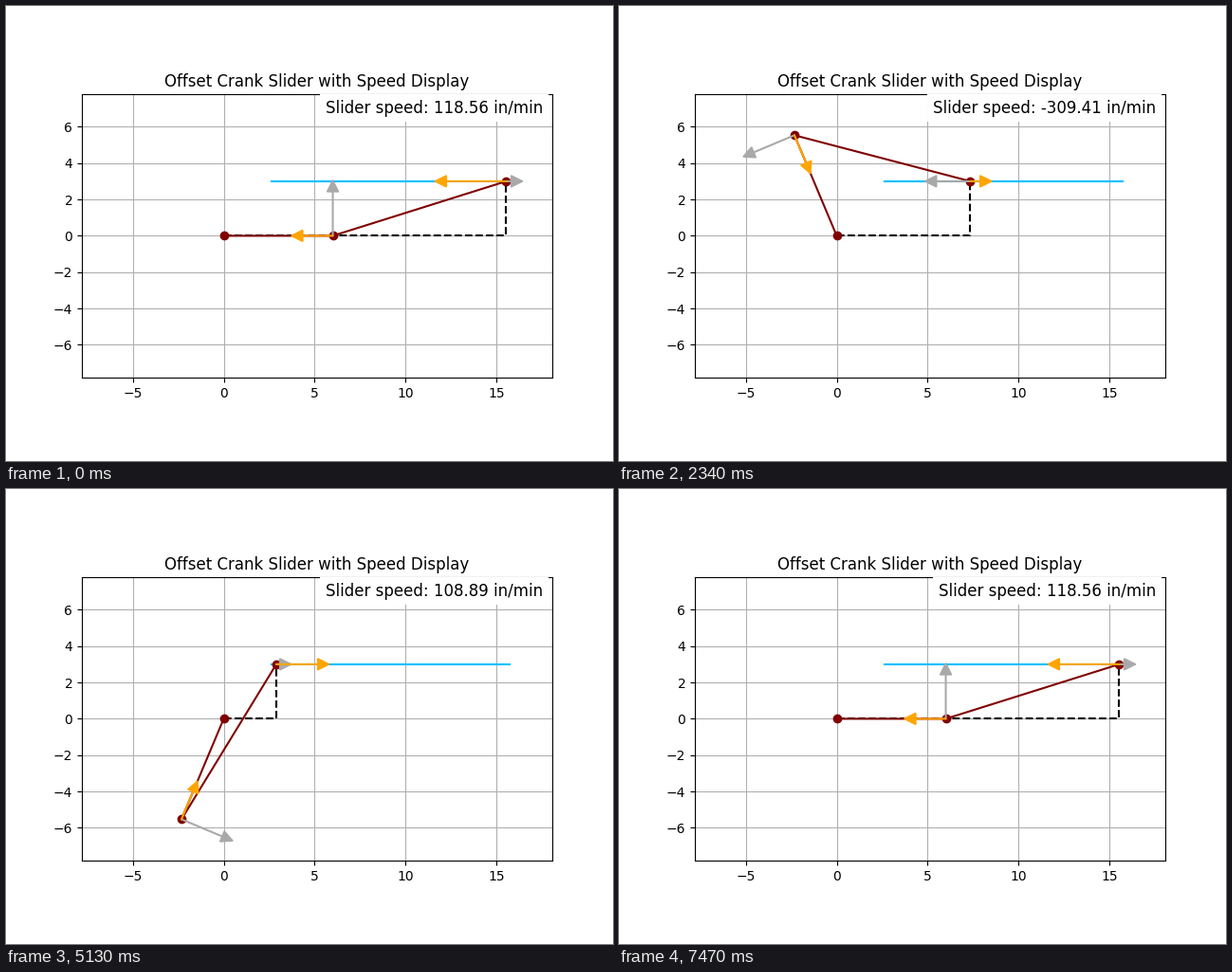
Write a matplotlib script that moves like this. It is 640x480 px and loops after 7.5 s.

```python
import numpy as np
import matplotlib.pyplot as plt
from matplotlib.animation import FuncAnimation
from matplotlib.patches import FancyArrowPatch

CRANK, ROD, OFFSET = 6, 10, 3     # inches
OMEGA = 10 * 2 * np.pi            # rad/min
V_SCALE, A_SCALE = 1 / 120, 1e-4  # arrow length per in/min, in/min^2
FRAMES = 250

angles = np.linspace(0, 2 * np.pi, FRAMES)
x_min = np.sqrt((ROD - CRANK) ** 2 - OFFSET ** 2)
x_max = np.sqrt((ROD + CRANK) ** 2 - OFFSET ** 2)

fig, ax = plt.subplots(figsize=(6.4, 4.8), dpi=100)
ax.set_aspect("equal")
ax.set_xlim(-1.3 * CRANK, 1.15 * x_max)
ax.set_ylim(-1.3 * CRANK, 1.3 * CRANK)
ax.grid(True)
ax.set_title("Offset Crank Slider with Speed Display")

ax.plot([x_min, x_max], [OFFSET, OFFSET], color="deepskyblue")
guide, = ax.plot([], [], "k--")
links, = ax.plot([], [], "o-", color="maroon")
label = ax.text(0.98, 0.95, "", transform=ax.transAxes, fontsize=12,
                ha="right", va="center",
                bbox=dict(facecolor="white", edgecolor="none"))


def add_arrow(color):
    arrow = FancyArrowPatch((0, 0), (1, 0), arrowstyle="-|>", color=color,
                            mutation_scale=20, lw=1.5, shrinkA=0, shrinkB=0,
                            zorder=3)
    return ax.add_patch(arrow)


pin_vel, slider_vel = add_arrow("darkgray"), add_arrow("darkgray")
pin_acc, slider_acc = add_arrow("orange"), add_arrow("orange")


def point(arrow, start, vector):
    arrow.set_positions(tuple(start), tuple(start + vector))


def slider_motion(t):
    """Slider position, speed and acceleration at crank angle t."""
    u = OFFSET - CRANK * np.sin(t)
    du, ddu = -CRANK * np.cos(t), CRANK * np.sin(t)
    w = np.sqrt(ROD ** 2 - u ** 2)
    dw = -u * du / w
    ddw = -(du ** 2 + u * ddu + dw ** 2) / w
    return (CRANK * np.cos(t) + w,
            OMEGA * (-CRANK * np.sin(t) + dw),
            OMEGA ** 2 * (-CRANK * np.cos(t) + ddw))


def update(i):
    t = angles[i]
    radial = np.array([np.cos(t), np.sin(t)])
    tangent = np.array([-np.sin(t), np.cos(t)])
    pin = CRANK * radial
    x, v, a = slider_motion(t)
    slider = np.array([x, OFFSET])

    links.set_data([0, pin[0], x], [0, pin[1], OFFSET])
    guide.set_data([0, x, x], [0, 0, OFFSET])
    point(pin_vel, pin, CRANK * OMEGA * V_SCALE * tangent)
    point(pin_acc, pin, -CRANK * OMEGA ** 2 * A_SCALE * radial)
    point(slider_vel, slider, np.array([v * V_SCALE, 0]))
    point(slider_acc, slider, np.array([a * A_SCALE, 0]))
    label.set_text(f"Slider speed: {v:.2f} in/min")
    return guide, links, pin_vel, slider_vel, pin_acc, slider_acc, label


anim = FuncAnimation(fig, update, frames=FRAMES, interval=30, repeat=True,
                     repeat_delay=0, blit=False)
plt.show()
```
